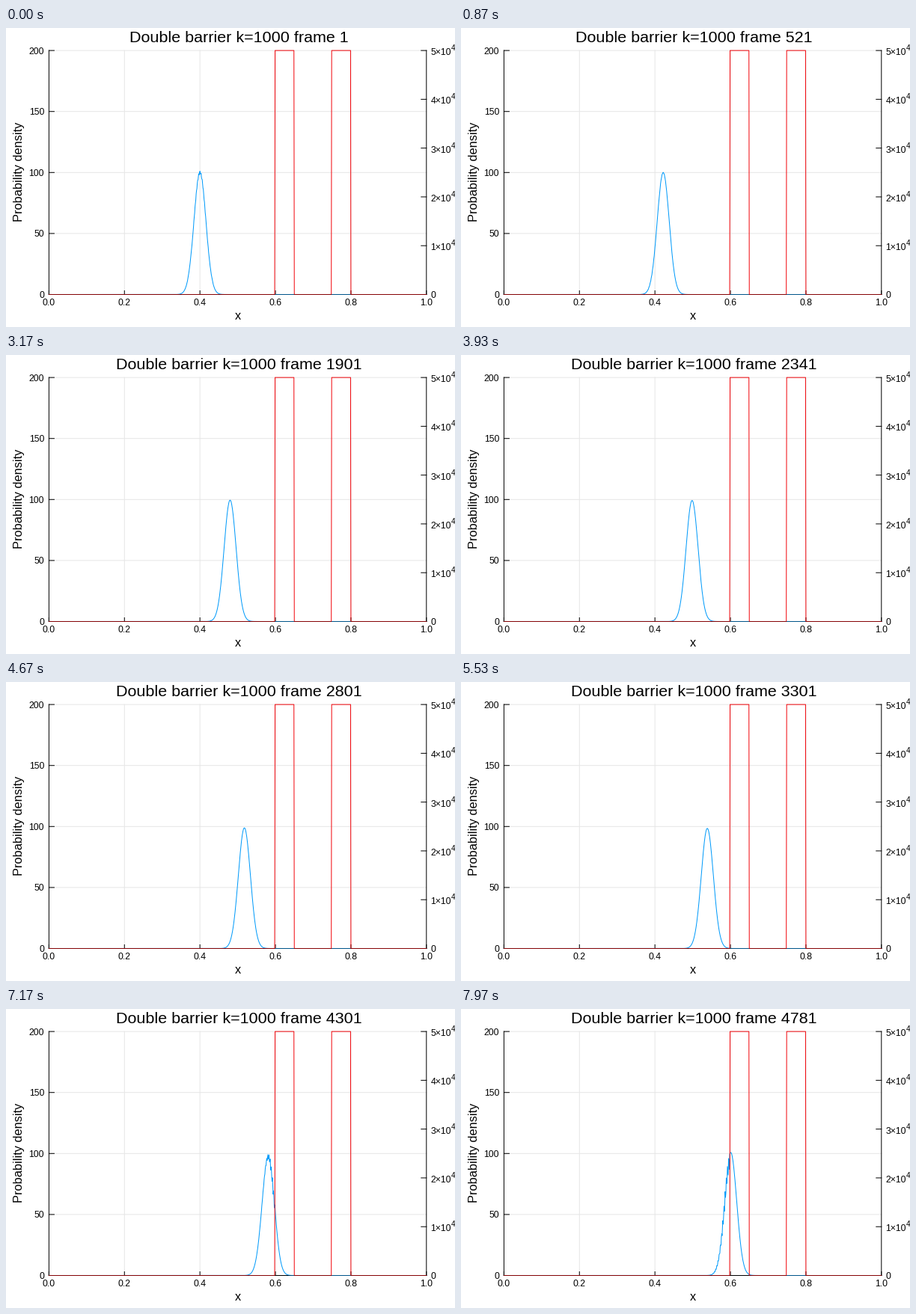
These frames come from a looping animation (600 px wide and 400 px high, 8000 ms). A matplotlib script:

```python
import numpy as np
import matplotlib.pyplot as plt
from matplotlib.animation import FuncAnimation

W, H, DPI = 600, 400, 100
PX = 72 / DPI                      # points per pixel
LEFT, RIGHT, TOP, BOTTOM = 57.4, 561.8, 30.1, 356.5
FRAMES, LOOP, STRIDE = 240, 8000, 20
BLUE, RED, GRID = "#009afa", "#f2060c", "#e6e6e6"

K, X0, WIDTH2 = 1000, 0.4, 1e-3    # wave number, start, packet width squared
DX, DT, V0 = 1e-3, 5e-8, 5e4
x = np.arange(1001) * DX

potential = np.zeros_like(x)
potential[599:650] = potential[749:800] = V0


def hamiltonian(f):
    out = potential * f
    out[1:-1] -= (f[2:] - 2 * f[1:-1] + f[:-2]) / (2 * DX * DX)
    out[0] = out[-1] = 0
    return out


def simulate():
    """Leapfrog Schroedinger solver; one density row per shown frame."""
    envelope = 10 * np.exp(-((x - X0) ** 2) / WIDTH2)
    re, im = envelope * np.cos(K * x), envelope * np.sin(K * x)
    rows = []
    for step in range((FRAMES - 1) * STRIDE + 1):
        re = re + DT * hamiltonian(im)
        last = im
        im = im - DT * hamiltonian(re)
        if step % STRIDE == 0:
            rows.append(re ** 2 + im * last)
    return rows


def px(u):
    return LEFT + (RIGHT - LEFT) * u


def py(v, top):
    return BOTTOM - (BOTTOM - TOP) * v / top


plt.rcParams["font.family"] = "Liberation Sans"
fig = plt.figure(figsize=(W / DPI, H / DPI), dpi=DPI, facecolor="white")
ax = fig.add_axes([0, 0, 1, 1])
ax.set_xlim(0, W)
ax.set_ylim(H, 0)
ax.axis("off")


def line(xs, ys, color="black", z=1, **kw):
    return ax.plot(xs, ys, color=color, lw=PX, zorder=z, snap=False, **kw)[0]


def label(tx, ty, text, size=12.2, **kw):
    return ax.text(tx, ty, text, fontsize=size * PX, va="baseline", **kw)


# grid, ticks and tick labels
for i in range(6):
    gx = px(i / 5)
    if 0 < i < 5:
        line([gx, gx], [TOP, BOTTOM], GRID, 0)
    line([gx, gx], [BOTTOM, BOTTOM - 5])
    label(gx, 371, f"{i / 5:.1f}", ha="center")

    ry = py(i, 5)
    line([RIGHT, RIGHT - 7], [ry, ry])
    if i:
        label(567.5, ry + 6, f"{i}×10")
        label(594.7, ry, "4", 10)
    else:
        label(567.5, ry + 4.5, "0")

for v in range(0, 201, 50):
    gy = py(v, 200)
    if v:
        line([LEFT, RIGHT], [gy, gy], GRID, 0)
    line([LEFT, LEFT + 7], [gy, gy])
    label(51, gy + 4.5, str(v), ha="right")

# axes and axis names
line([LEFT, LEFT], [TOP, BOTTOM])
line([RIGHT, RIGHT], [TOP, BOTTOM])
line([LEFT, RIGHT], [BOTTOM, BOTTOM])
line([LEFT, RIGHT], [BOTTOM, BOTTOM], z=4, alpha=0.45)
label(309.8, 390, "x", 16.3, ha="center")
label(22, 192.5, "Probability density", 16.4, ha="center",
      rotation=90, rotation_mode="anchor")

# series
density = simulate()
wave = line(px(x), py(density[0], 200), BLUE, 2)
line(px(x), py(potential, V0), RED, 3)
title = label(311.5, 18.6, "", 21.45, ha="center")


def draw(i):
    wave.set_ydata(py(density[i], 200))
    title.set_text(f"Double barrier k=1000 frame {1 + STRIDE * i}")
    return wave, title


anim = FuncAnimation(fig, draw, frames=FRAMES, interval=LOOP / FRAMES,
                     repeat=True, repeat_delay=0)
plt.show()
```
